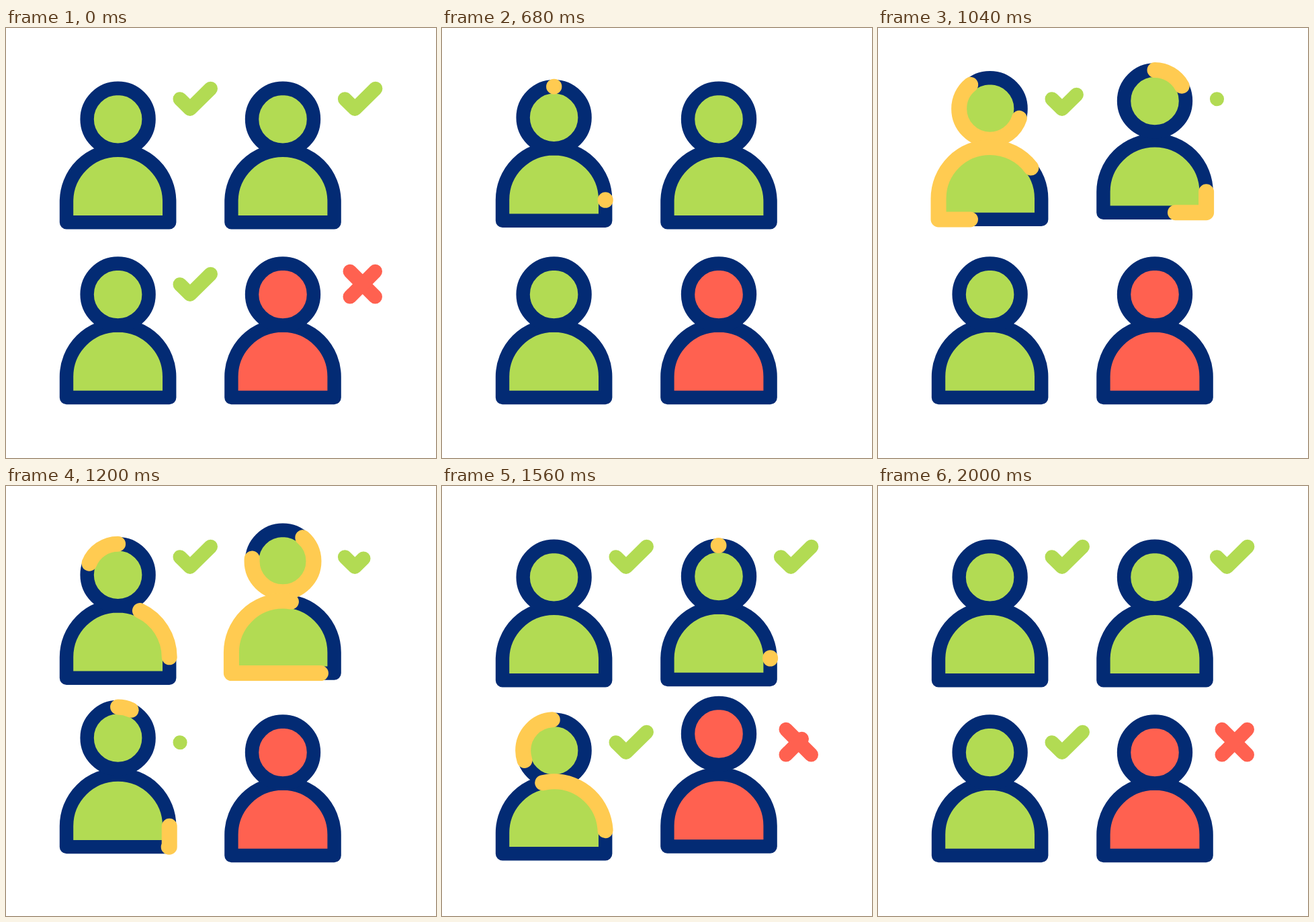
Recreate the animation shown at these times as an HTML page. Size 640x640 px, loop 2080 ms.

```html
<!DOCTYPE html>
<html lang="en">
<head>
<meta charset="utf-8">
<title>Team approval</title>
<style>
  html, body { margin: 0; width: 100%; height: 100%; overflow: hidden; background: #fff; }
  svg { display: block; width: 100%; height: 100%; }
  path { fill: none; stroke-linecap: round; stroke-linejoin: round; }
  .outline { stroke: #032b74; stroke-width: 20.4; }
  .glow { stroke: #ffcb51; stroke-width: 23; }
  .mark { stroke-width: 21; }
</style>
</head>
<body>
<svg viewBox="0 0 640 640"></svg>
<script>
const LOOP = 2080;
const GREEN = '#b2db53', RED = '#ff6150';
const HEAD = 'M166.6 89.8a46 46 0 0 1 0 92a46 46 0 0 1 0 -92';
const BODY = 'M243.2 258.4V289.3H90V258.4A76.6 76.6 0 0 1 243.2 258.4';
const TICK = ['M259 105.7L274 120.4L304.5 90.2'];
const CROSS = ['M549.5 400L512 362.3', 'M512 400L549.5 362.3'];

// lead: how far the first jump runs ahead of the shared rhythm
const people = [
  { x: 0, y: 0, delay: 0, lead: 45, color: GREEN, glow: true, mark: TICK, markY: 0, drawAt: 822 },
  { x: 245.4, y: 0, delay: 200, lead: 0, color: GREEN, glow: true, mark: TICK, markY: 0, drawAt: 1028 },
  { x: 0, y: 260.7, delay: 400, lead: 0, color: GREEN, glow: true, mark: TICK, markY: 276, drawAt: 1188 },
  { x: 245.4, y: 260.7, delay: 600, lead: 0, color: RED, glow: false, mark: CROSS, markY: 0, drawAt: 1338 }
];

const svg = document.querySelector('svg');
const clamp = (v, a = 0, b = 1) => Math.min(b, Math.max(a, v));

function add(parent, tag, attrs = {}) {
  const el = document.createElementNS('http://www.w3.org/2000/svg', tag);
  for (const key in attrs) el.setAttribute(key, attrs[key]);
  return parent.appendChild(el);
}

const addPath = (parent, d, cls) => add(parent, 'path', { d, class: cls, pathLength: 100 });

function addPart(parent, d, person) {
  const group = add(parent, 'g');
  addPath(group, d, 'outline').style.fill = person.color;
  return group;
}

for (const p of people) {
  const figure = add(svg, 'g', { transform: `translate(${p.x} ${p.y})` });
  p.body = addPart(figure, BODY, p);
  p.head = addPart(figure, HEAD, p);
  if (p.glow) {
    p.headGlow = addPath(add(figure, 'g'), HEAD, 'glow');
    p.bodyGlow = addPath(add(figure, 'g'), BODY, 'glow');
  }
  const markX = p.mark === CROSS ? 0 : p.x;
  const sign = add(svg, 'g', { transform: `translate(${markX} ${p.markY})` });
  p.strokes = p.mark.map(d => {
    const path = addPath(sign, d, 'mark');
    path.style.stroke = p.color;
    return path;
  });
}

// cubic-bezier(.4, 0, .4, 1) between two times
function ease(t, from, to) {
  const u = clamp((t - from) / (to - from));
  if (u === 0 || u === 1) return u;
  let lo = 0, hi = 1, s = .5;
  for (let i = 0; i < 22; i++) {
    s = (lo + hi) / 2;
    const x = 1.2 * s * (1 - s) + s ** 3;
    if (x < u) lo = s; else hi = s;
  }
  return s * s * (3 - 2 * s);
}

function trim(path, start, end) {
  const shown = end > start;
  path.style.visibility = shown ? 'visible' : 'hidden';
  if (!shown) return;
  path.style.strokeDasharray = `${Math.max(.1, (end - start) * 100)} 1000`;
  path.style.strokeDashoffset = -start * 100;
}

// fast push off, then free fall
function jump(t, height, peak, rise, power, gravity) {
  return t < peak
    ? height * (1 - clamp((peak - t) / rise) ** power)
    : Math.max(0, height - gravity * (t - peak) ** 2);
}

function lifts(t) {
  const bounce = Math.max(0, 3.9 - .000183 * (t - 1242) ** 2);
  const body = Math.max(bounce, jump(t, 15, 900, 185, 3.1, .00042));
  const head = Math.max(body, jump(t, 29.4, 905, 171, 2.66, .00058));
  return { body, head };
}

const lift = (el, y) => el.setAttribute('transform', `translate(0 ${-y})`);

function render(time) {
  const erased = ease(time, 180, 525);
  for (const p of people) {
    const t = time - p.delay + p.lead * clamp((1200 - time) / 400);
    const { body, head } = lifts(t);
    lift(p.body, body);
    lift(p.head, head);
    if (p.glow) {
      const end = ease(t, 720, 1205), start = ease(t, 900, 1388);
      lift(p.bodyGlow, body);
      lift(p.headGlow, head);
      trim(p.bodyGlow, start, end);
      trim(p.headGlow, start, end);
    }
    const drawn = time < p.drawAt ? 1 - erased : ease(time, p.drawAt, p.drawAt + 360);
    const count = p.strokes.length;
    p.strokes.forEach((path, i) => trim(path, 0, clamp(drawn * count - i)));
  }
}

const began = performance.now();
function tick() {
  render((performance.now() - began) % LOOP);
  requestAnimationFrame(tick);
}
tick();
</script>
</body>
</html>
```
